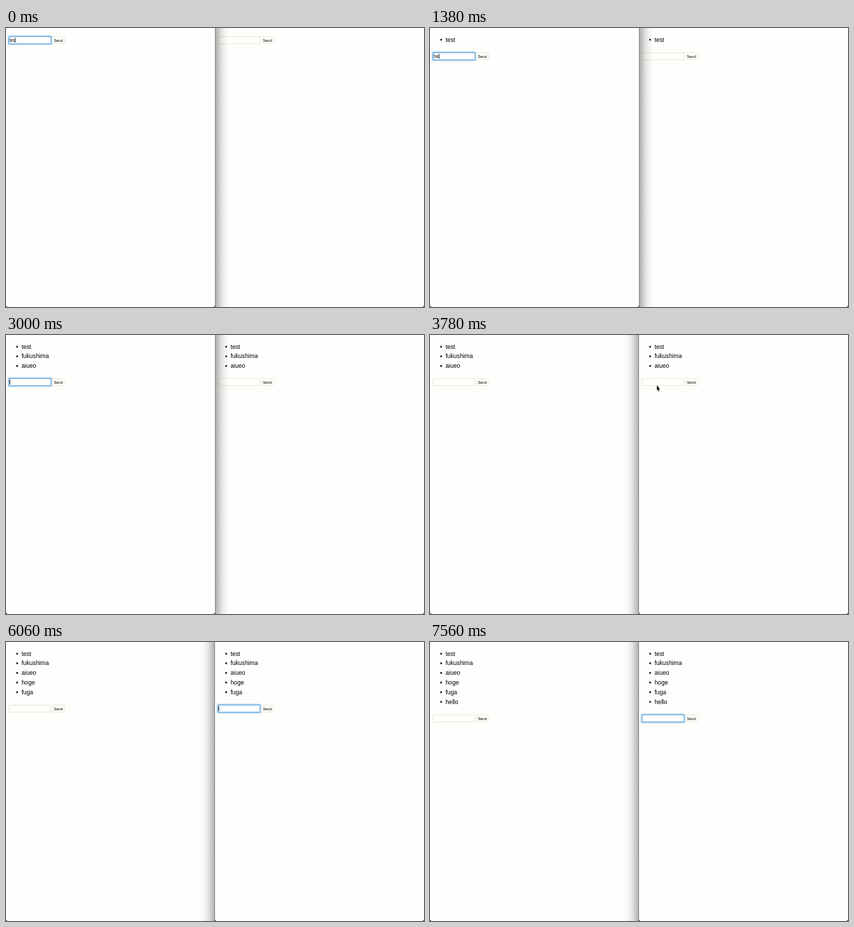
An HTML page with a canvas for the animation above (7620 ms loop, 600 by 400 pixels).

```html
<!DOCTYPE html>
<html lang="en">
<head>
<meta charset="utf-8">
<title>Live chat</title>
<style>
html, body { margin: 0; width: 100%; height: 100%; overflow: hidden; background: #fefefc; }
canvas { display: block; width: 600px; height: 400px; }
</style>
</head>
<body>
<canvas id="stage" width="600" height="400"></canvas>
<script>
const ctx = document.getElementById('stage').getContext('2d');
const LOOP = 7620, STEP = 60, PANE = 300, ROW = 13.8;
const FONT = '"Liberation Sans", Arial, sans-serif';
const SQUEEZE = 0.88; // the screen is shown narrower than it is
const SWITCH = 3600, CLICK = 3960, POINTER_IN = 3240, POINTER_OUT = 4260;

// Each message: pane, time of every key press, time of sending.
const messages = [
  { pane: 0, text: 'test', keys: [-180, -120, -60, 60], sent: 300 },
  { pane: 0, text: 'fukushima', keys: [1200, 1260, 1380, 1440, 1500, 1560, 1620, 1680, 1740], sent: 1980 },
  { pane: 0, text: 'aiueo', keys: [2220, 2340, 2460, 2580, 2640], sent: 2820 },
  { pane: 1, text: 'hoge', keys: [4260, 4380, 4500, 4620], sent: 4800 },
  { pane: 1, text: 'fuga', keys: [5460, 5580, 5640, 5820], sent: 6000 },
  { pane: 1, text: 'hello', keys: [6300, 6420, 6480, 6600, 6720], sent: 6840 }
];
const actions = messages.flatMap(m => [...m.keys, m.sent]).concat(CLICK);

// Draws text and returns the x where it ends.
function label(text, x, y, size) {
  ctx.save();
  ctx.translate(x, y);
  ctx.scale(SQUEEZE, 1);
  ctx.font = size + 'px ' + FONT;
  ctx.fillStyle = '#000';
  ctx.fillText(text, 0, 0);
  const end = x + ctx.measureText(text).width * SQUEEZE;
  ctx.restore();
  return end;
}

function frame(x, y, w, h, color, width = 1, radius = 0) {
  ctx.strokeStyle = color;
  ctx.lineWidth = width;
  ctx.beginPath();
  ctx.roundRect(x, y, w, h, radius);
  ctx.stroke();
}

function drawList(x, items) {
  items.forEach((m, i) => {
    const y = 16.3 + i * ROW;
    ctx.fillStyle = '#000';
    ctx.beginPath();
    ctx.ellipse(x + 16, y + 0.5, 1.2, 1.4, 0, 0, Math.PI * 2);
    ctx.fill();
    label(m.text, x + 22.3, y + 3.2, 9.8);
  });
}

function drawForm(x, y, focused, text, caret) {
  ctx.fillStyle = '#fff';
  ctx.fillRect(x + 4, y - 5, 61, 11);
  if (focused) {
    frame(x + 3.5, y - 5.5, 62, 12, '#a9d3f2', 2, 1.5);
    frame(x + 4.5, y - 4.5, 60, 10, '#72addc', 1, 0.5);
  } else {
    frame(x + 4.5, y - 4.5, 60, 10, '#ebebd2');
  }
  frame(x + 66.5, y - 4.5, 18, 10, '#ebebdf', 1, 1);
  label('Send', x + 68.7, y + 2.8, 6.2);
  const end = label(text, x + 5.3, y + 2.7, 6.3);
  if (focused && caret) {
    ctx.fillStyle = '#000';
    ctx.fillRect(end, y - 3, 0.8, 7);
  }
}

function drawShadow(active) {
  const end = active ? 279 : 321;
  const g = ctx.createLinearGradient(PANE, 0, end, 0);
  [[0, .44], [.15, .34], [.3, .24], [.5, .12], [.75, .04], [1, 0]]
    .forEach(([p, a]) => g.addColorStop(p, `rgba(64,64,66,${a})`));
  ctx.fillStyle = g;
  ctx.fillRect(Math.min(PANE, end), 0, 21, 400);
  ctx.fillStyle = '#85858a';
  ctx.fillRect(active ? 299 : 300, 0, 1, 400);
}

function corner(x, dir) {
  ctx.fillStyle = '#222';
  ctx.beginPath();
  ctx.moveTo(x, 400);
  ctx.lineTo(x, 397);
  ctx.quadraticCurveTo(x, 400, x + 3 * dir, 400);
  ctx.fill();
}

function drawPointer(t) {
  const p = Math.min(1, (t - POINTER_IN) / (SWITCH - POINTER_IN));
  const ease = 1 - (1 - p) ** 3;
  ctx.save();
  ctx.translate(130 + 195.7 * ease, 84 - 12 * ease);
  ctx.beginPath();
  [[0, 0], [0, 7.6], [1.4, 6.2], [2.4, 8.8], [3.5, 8.3], [2.5, 5.8], [4.4, 5.7]]
    .forEach(([x, y]) => ctx.lineTo(x, y));
  ctx.closePath();
  ctx.fillStyle = '#000';
  ctx.fill();
  ctx.restore();
}

function draw(t) {
  const items = messages.filter(m => t >= m.sent);
  const draft = messages[items.length];
  const typed = draft ? draft.text.slice(0, draft.keys.filter(k => t >= k).length) : '';
  const lastAction = Math.max(...actions.filter(a => a <= t));
  const caret = (t - lastAction) % 1060 < 530;
  const active = t < SWITCH ? 0 : 1;
  const focus = t < SWITCH ? 0 : t < CLICK ? -1 : 1;
  const formY = items.length ? 26 + items.length * ROW : 17;

  ctx.fillStyle = '#fefefc';
  ctx.fillRect(0, 0, 600, 400);
  for (const pane of [0, 1]) {
    const x = pane * PANE;
    drawList(x, items);
    drawForm(x, Math.round(formY), pane === focus, draft && draft.pane === pane ? typed : '', caret);
  }
  drawShadow(active);
  corner(0, 1);
  corner(300, active ? 1 : -1);
  corner(600, -1);
  if (t >= POINTER_IN && t < POINTER_OUT) drawPointer(t);
}

const start = performance.now();
function tick() {
  const t = (performance.now() - start) % LOOP;
  draw(Math.floor(t / STEP) * STEP);
  requestAnimationFrame(tick);
}
tick();
</script>
</body>
</html>
```
